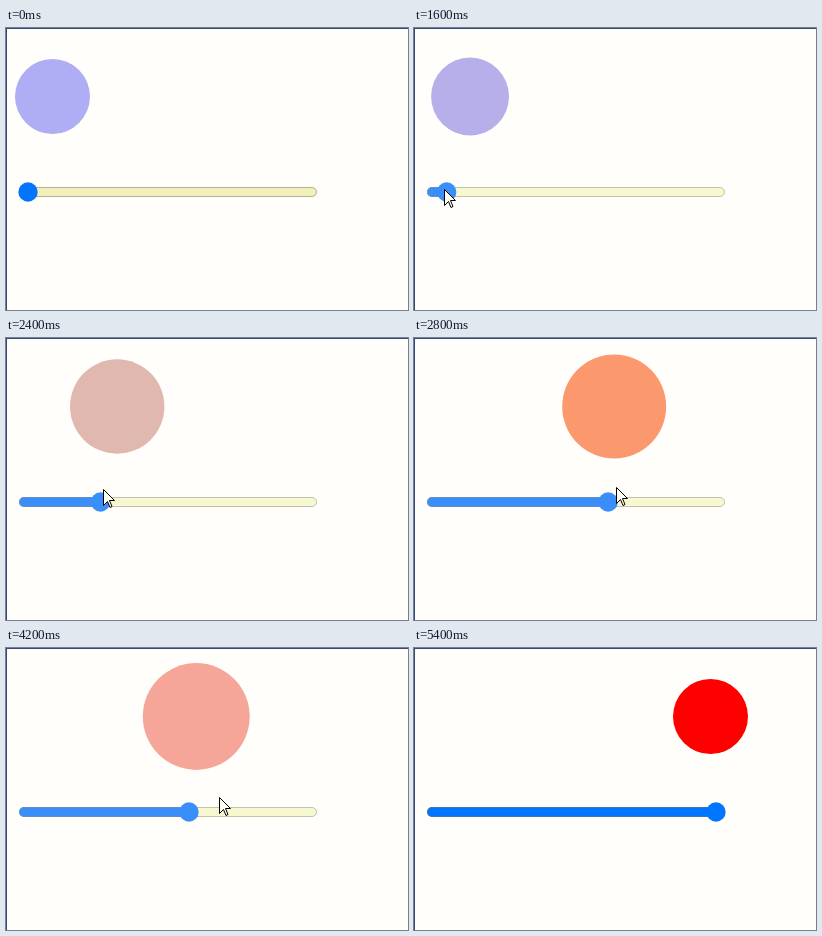
An HTML page with a canvas that plays this animation: 402 by 282 pixels, repeating every 6 s.

```html
<!DOCTYPE html>
<html lang="en">
<head>
<meta charset="utf-8">
<title>Slider</title>
<style>
html, body { margin: 0; width: 100%; height: 100%; overflow: hidden; background: #fffefa; }
canvas { display: block; }
</style>
</head>
<body>
<canvas id="stage" width="402" height="282"></canvas>
<script>
const ctx = document.getElementById('stage').getContext('2d');
const LOOP = 6000, TICK = 200;
const SHOW = 400, OVER = 800, PRESS = 1600, RELEASE = 5400;
const LEFT = 22, SPAN = 280;

// Pointer path: [ms, x, y]; it swings back and forth at DRAG_Y once on the slider
const DRAG_Y = 149;
const path = [
  [400, 74, 207], [800, 33, 166], [1200, 26, 160], [1400, 48, 179], [1600, 30, 161],
  [2400, 97, 151], [2800, 202, DRAG_Y], [3000, 318, DRAG_Y], [3200, 336, DRAG_Y],
  [3400, 336, DRAG_Y], [3600, 231, DRAG_Y], [3800, 32, DRAG_Y], [4000, 12, DRAG_Y],
  [4200, 213, DRAG_Y], [4400, 318, DRAG_Y], [4600, 8, DRAG_Y], [4800, 321, DRAG_Y],
  [5000, 385, DRAG_Y - 2]
];

// Ball colour: [slider value, r, g, b]
const hues = [
  [0, 175, 173, 243], [.26, 224, 184, 176], [.57, 245, 168, 158],
  [.63, 255, 146, 92], [1, 255, 0, 0]
];

const looks = {
  idle: { accent: '#0075ff', track: '#f0f0b8', edge: '#76767680' },
  over: { accent: '#0075ff', track: '#e6e6b0', edge: '#4f4f4f80' },
  hover: { accent: '#005cc8', track: '#e6e6b0', edge: '#4f4f4f80' },
  drag: { accent: '#3a8efa', track: '#f8f8d0', edge: '#8d8d8d80' }
};

const clamp = (v, lo, hi) => Math.max(lo, Math.min(hi, v));

// Straight line between key rows; the first column is the position
function between(rows, at) {
  let i = 1;
  while (i < rows.length - 1 && at > rows[i][0]) i++;
  const a = rows[i - 1], b = rows[i];
  const k = clamp((at - a[0]) / (b[0] - a[0]), 0, 1);
  return a.slice(1).map((v, n) => v + (b[n + 1] - v) * k);
}

// The thumb trails the pointer a little, never by more than 30 px
function valueAt(t) {
  if (t < PRESS) return 0;
  const x = between(path, t)[0];
  const lag = clamp((x - between(path, t - TICK)[0]) * .15, -30, 30);
  return clamp((x - lag - LEFT) / SPAN, 0, 1);
}

function lookAt(t) {
  if (t < OVER || t >= RELEASE) return looks.idle;
  if (t >= PRESS) return looks.drag;
  return t < OVER + TICK ? looks.over : looks.hover;
}

function disc(x, y, r, color) {
  ctx.fillStyle = color;
  ctx.beginPath();
  ctx.arc(x, y, r, 0, Math.PI * 2);
  ctx.fill();
}

function bar(x, y, w, h, r, color) {
  ctx.beginPath();
  ctx.roundRect(x, y, w, h, r);
  ctx.fillStyle = color;
  ctx.fill();
}

function slider(p, look) {
  const x = LEFT + SPAN * p;
  bar(13, 159, 298, 10, 5, look.track);
  bar(13, 159, x - 13, 10, [5, 0, 0, 5], look.accent);
  bar(13.5, 159.5, 297, 9, 4.5, 'transparent');
  ctx.strokeStyle = look.edge;
  ctx.stroke();
  disc(x, 164, 9.7, look.accent);
}

function pointer(x, y) {
  const shape = [[0, 0], [0, 16], [4, 12], [6.5, 18], [8.5, 17], [6, 11], [11, 11]];
  ctx.beginPath();
  for (const [dx, dy] of shape) ctx.lineTo(x + dx + .5, y + dy + .5);
  ctx.closePath();
  ctx.fillStyle = '#fffff4';
  ctx.fill();
  ctx.strokeStyle = '#000';
  ctx.stroke();
}

function draw(t) {
  const p = valueAt(t);

  ctx.fillStyle = '#fffefa';
  ctx.fillRect(0, 0, 402, 282);
  ctx.fillStyle = '#34497c';
  ctx.fillRect(0, 0, 402, 1);
  ctx.fillRect(0, 0, 1, 282);

  const grow = 1 + Math.min(p, 1 - p);
  disc(46.5 + 250 * p, 68.5, 37.5 * grow, `rgb(${between(hues, p).map(Math.round)})`);
  slider(p, lookAt(t));
  if (t >= SHOW && t < RELEASE) pointer(...between(path, t).map(Math.round));
}

const start = performance.now();
function frame() {
  const t = (performance.now() - start) % LOOP;
  draw(Math.floor(t / TICK) * TICK);
  requestAnimationFrame(frame);
}
frame();
</script>
</body>
</html>
```
